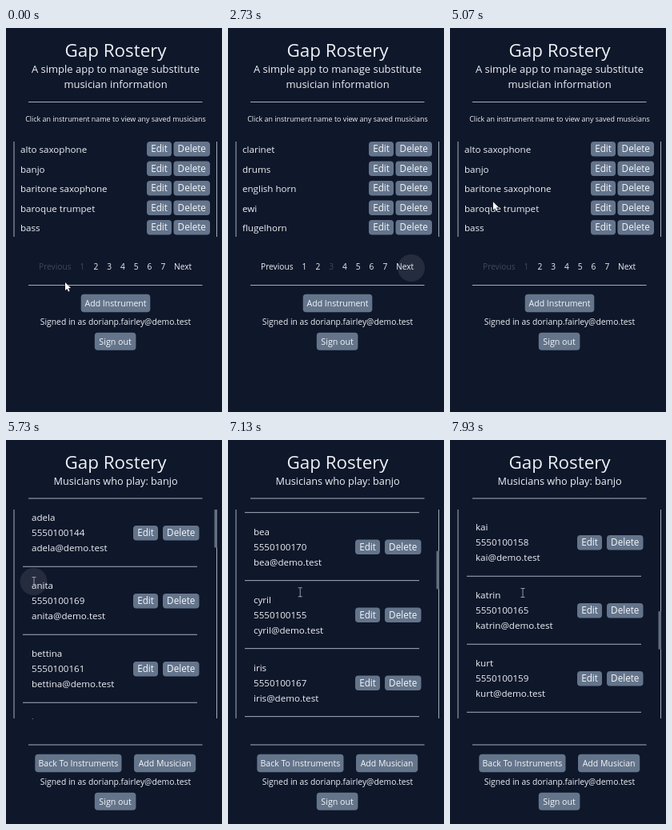
Write an HTML page with a canvas that moves like this. It is 270x480 px and loops after 8 s.

```html
<!DOCTYPE html>
<html lang="en">
<head>
<meta charset="utf-8">
<title>Gap Rostery</title>
<style>
  html, body { margin: 0; width: 100%; height: 100%; overflow: hidden; background: #0f172a; }
  canvas { display: block; }
</style>
</head>
<body>
<canvas id="stage" width="270" height="480"></canvas>
<script>
const ctx = document.getElementById('stage').getContext('2d');
const LOOP = 8000;
const BG = '#0f172a', INK = '#edf1f6', LINE = '#cbd5e1', BUTTON = '#64748b', DIM = '#414859';

const pages = {
  1: ['alto saxophone', 'banjo', 'baritone saxophone', 'baroque trumpet', 'bass'],
  2: ['bass clarinet', 'bass guitar', 'bassoon', 'bongos', 'cello'],
  3: ['clarinet', 'drums', 'english horn', 'ewi', 'flugelhorn']
};
const musicians = [
  ['adela', 144], ['anita', 169], ['bettina', 161], ['bea', 170], ['cyril', 155],
  ['iris', 167], ['ivo', 163], ['kai', 158], ['katrin', 165], ['kurt', 159]
];

// Keyframes: [time, value, ...]
const pointerKeys = [[70, 74, 318], [1400, 228, 300], [3400, 228, 300], [3730, 92, 298],
  [4670, 92, 298], [5270, 35, 177], [6130, 35, 177], [6430, 90, 190], [7070, 90, 190], [7330, 91, 191]];
const scrollKeys = [[6430, 0], [6670, 127], [6800, 170], [7000, 170], [7330, 340], [7540, 340],
  [7600, 373.4], [7930, 583]];
const clicks = [[1530, 229, 300], [2600, 229, 300], [4200, 95, 302], [5600, 34.5, 177]];

function sample(keys, t) {
  const next = keys.findIndex(k => k[0] > t);
  if (next === 0) return keys[0].slice(1);
  if (next < 0) return keys[keys.length - 1].slice(1);
  const a = keys[next - 1], b = keys[next];
  const p = (t - a[0]) / (b[0] - a[0]);
  return a.slice(1).map((v, i) => v + (b[i + 1] - v) * p);
}

function text(str, x, y, size, align = 'left', color = INK) {
  ctx.font = `${size}px "Open Sans", "Noto Sans", sans-serif`;
  ctx.textAlign = align;
  ctx.fillStyle = color;
  ctx.fillText(str, x, y);
}

function rect(x, y, w, h, color = LINE) {
  ctx.fillStyle = color;
  ctx.fillRect(x, y, w, h);
}

// Hairlines centred on their coordinate
const hline = (x, y, w) => rect(x, y - 0.4, w, 0.8);
const vline = (x, y, h) => rect(x - 0.4, y, 0.8, h);

function frame(top, height) {
  vline(10, top, height);
  vline(263.5, top, height);
}

function button(label, x, y, w, h, size) {
  ctx.fillStyle = BUTTON;
  ctx.beginPath();
  ctx.roundRect(x, y, w, h, 4);
  ctx.fill();
  text(label, x + w / 2, y + h / 2 + size * 0.36, size, 'center', '#f4f7fa');
}

function rowButtons(x, y, gap) {
  button('Edit', x, y, 31, 18.5, 11.7);
  button('Delete', x + 31 + gap, y, 45.5, 18.5, 11.7);
}

function account(y) {
  text('Signed in as dorianp.fairley@demo.test', 137, y, 10.35, 'center');
  button('Sign out', 110.8, y + 9.8, 51.6, 22, 10.7);
}

function instruments(page) {
  text('A simple app to manage substitute', 137, 56, 12.97, 'center');
  text('musician information', 137, 75, 12.97, 'center');
  hline(28, 92.5, 217.5);
  text('Click an instrument name to view any saved musicians', 137, 117, 8.94, 'center');

  frame(142, 119);
  pages[page].forEach((name, i) => {
    const y = 142 + i * 24.5;
    text(name, 18, y + 14, 11.6);
    rowButtons(176, y, 2.5);
  });

  text('Previous', 41, 301.5, 10.2, 'left', page === 1 ? DIM : INK);
  for (let n = 1; n <= 7; n++)
    text(n, 78.7 + n * 16.8, 301.5, 10.2, 'center', n === page ? DIM : INK);
  text('Next', 210, 301.5, 10.2);

  hline(28, 321.5, 217.5);
  button('Add Instrument', 93.7, 332.8, 86.6, 22.4, 10.5);
  account(371);
}

function players(scroll) {
  text('Musicians who play: banjo', 137, 55.5, 12.7, 'center');
  hline(28, 73, 217.5);
  frame(87, 261);

  ctx.save();
  ctx.beginPath();
  ctx.rect(0, 87, 270, 261.5);
  ctx.clip();
  musicians.forEach(([name, line], i) => {
    const y = 87 + i * 85 - scroll;
    text(name, 32, y + 14.2, 11.6);
    text('5550100' + line, 32, y + 33.2, 11.6);
    text(name + '@demo.test', 32, y + 52.2, 11.6);
    rowButtons(159, y + 20, 6);
    hline(21, y + 71.2, 218);
  });
  ctx.restore();
  rect(260.5, 87 + scroll * 0.218, 3.5, 47.5, '#64707f');

  hline(28, 381, 217.5);
  button('Back To Instruments', 36.3, 392.8, 108.2, 22.4, 10.5);
  button('Add Musician', 160, 392.8, 77.2, 22.4, 10.5);
  account(431);
}

function ripple(t) {
  for (const [start, x, y] of clicks) {
    const age = (t - start) / 330;
    if (age <= 0 || age >= 1) continue;
    ctx.fillStyle = `rgba(205, 205, 215, ${0.19 * (1 - age)})`;
    ctx.beginPath();
    ctx.arc(x, y, 17 * Math.min(1, age * 2.6), 0, 7);
    ctx.fill();
  }
}

function arrow(x, y) {
  ctx.beginPath();
  [[0, 0], [0, 10], [2.3, 8], [4, 11.5], [5.6, 10.8], [4, 7.3], [7, 7]]
    .forEach(([dx, dy]) => ctx.lineTo(x + dx, y + dy));
  ctx.closePath();
  ctx.lineWidth = 1;
  ctx.strokeStyle = '#111';
  ctx.stroke();
  ctx.fillStyle = '#fff';
  ctx.fill();
}

function beam(x, y) {
  const color = '#949ba8';
  rect(x - 0.5, y - 5, 1, 11, color);
  rect(x - 2.5, y - 6, 5, 1, color);
  rect(x - 2.5, y + 5, 5, 1, color);
}

function draw(t) {
  rect(0, 0, 270, 480, BG);
  text('Gap Rostery', 137, 36, 22.4, 'center');
  if (t >= 5670) players(sample(scrollKeys, t)[0]);
  else instruments(t < 1600 ? 1 : t < 2650 ? 2 : t < 4300 ? 3 : 1);
  ripple(t);

  const [x, y] = sample(pointerKeys, t);
  const within = (a, b) => t >= a && t < b;
  if (t >= 5670) beam(x, y);
  else if (within(0, 1400) || within(3400, 3930) || within(4670, 5270)) arrow(x, y);
}

function tick() {
  draw(performance.now() % LOOP);
  requestAnimationFrame(tick);
}
tick();
</script>
</body>
</html>
```
